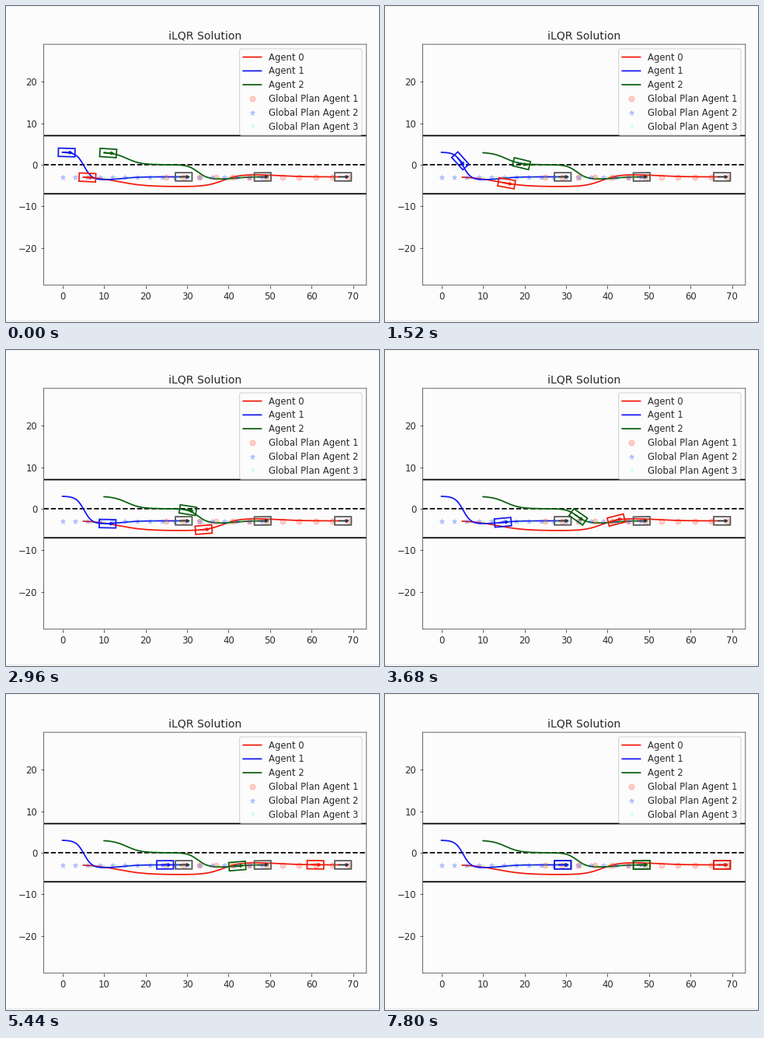
Recreate the animation shown at these times as a matplotlib script. Size 480 by 406 pixels, loop 8.24 s.

```python
import numpy as np
import matplotlib.pyplot as plt
from matplotlib.animation import FuncAnimation
from matplotlib.lines import Line2D
from matplotlib.patches import Polygon

W, H, DPI = 480, 406, 80
K = 1.047  # scales point sizes to the plot's size on the stage
STEP, LOOP, END = 40, 8240, 6360
BG, INK = "#fcfcfc", "#2a2a2a"
RED, BLUE, GREEN = "#f21a0a", "#1018f0", "#0a5f0e"

plt.rcParams.update({
    "font.family": "DejaVu Sans", "font.size": 10 * K, "text.color": INK,
    "axes.linewidth": 0.8 * K, "axes.edgecolor": "#606060",
    "axes.titlepad": 6 * K, "path.snap": False,
    "lines.linewidth": 1.5 * K, "lines.markersize": 6 * K,
})
for axis in ("xtick", "ytick"):
    plt.rcParams.update({
        f"{axis}.major.size": 3.5 * K, f"{axis}.major.width": 0.8 * K,
        f"{axis}.major.pad": 3.5 * K, f"{axis}.color": "#505050",
        f"{axis}.labelcolor": INK})


def spline(u, pts, vals):
    """Smooth curve through the points (pts, vals)."""
    m = np.gradient(vals, pts, edge_order=2)
    i = min(np.searchsorted(pts, u, side="right"), len(pts) - 1) - 1
    h = pts[i + 1] - pts[i]
    s = (u - pts[i]) / h
    d = (vals[i + 1] - vals[i]) / h
    b = 3 * d - 2 * m[i] - m[i + 1]
    c = m[i] + m[i + 1] - 2 * d
    return vals[i] + h * s * (m[i] + s * (b + s * c))


class Agent:
    """Drives along a lane joined by smooth shifts (rise, centre, width)."""

    def __init__(self, color, xs, y0, *shifts):
        self.color, self.xs, self.y0, self.shifts = color, xs, y0, shifts

    def y(self, x):
        return self.y0 + sum(r / 2 * (1 + np.tanh((x - c) / w))
                             for r, c, w in self.shifts)

    def pose(self, sec):
        x = spline(sec, TIMES, self.xs)
        return x, self.y(x), np.arctan((self.y(x + .01) - self.y(x - .01)) / .02)


# key times in seconds; each agent lists its x there
TIMES = [0, 0.8, 2.16, 2.96, 4.48, 5.44, END / 1000]
AGENTS = [
    Agent(RED, [5, 8.7, 23.2, 33, 49.7, 59.9, 66.55], -2.85,
          (-2.44, 13.5, 6.5), (3, 38.6, 4), (-0.64, 52, 6)),
    Agent(BLUE, [0, 1.9, 6.5, 9.85, 18.5, 23.7, 28.2], 3,
          (-6.7, 5.2, 1.9), (0.78, 14.5, 4)),
    Agent(GREEN, [10, 13.8, 23.8, 29.2, 35.1, 41.1, 47.2], 3,
          (-3, 15.5, 3.4), (-3.5, 32.6, 2.4), (0.57, 42, 3)),
]

BOX = np.array([(-1, -1), (3, -1), (3, 1), (-1, 1)])
ARROW = np.array([(0, -.08), (1.65, -.08), (1.65, -.36), (2.35, 0),
                  (1.65, .36), (1.65, .08), (0, .08)])


def add_car(ax, edge, fill, z):
    box = Polygon(BOX, fill=False, ec=edge, lw=1.5 * K, zorder=z)
    arrow = Polygon(ARROW, fc=fill, ec=fill, lw=0.9 * K, zorder=z)
    ax.add_patch(box)
    ax.add_patch(arrow)
    return box, arrow


def move(car, x, y, a):
    c, s = np.cos(a), np.sin(a)
    for part, shape in zip(car, (BOX, ARROW)):
        part.set_xy(shape @ np.array([(c, s), (-s, c)]) + (x, y))


fig = plt.figure(figsize=(W / DPI, H / DPI), dpi=DPI, facecolor=BG)
for y, shade in ((0.5, "#f2f2f2"), (404.5, "#e6e6e6")):
    fig.add_artist(Line2D([0, 1], [1 - y / H] * 2, color=shade, lw=0.9))

L, R, T, B = 48.5, 463.8, 49.2, 358.6
ax = fig.add_axes([L / W, 1 - B / H, (R - L) / W, (B - T) / H], facecolor=BG)
ax.set_xlim(-4.53, 73.18)
ax.set_ylim(-28.99, 28.99)
ax.set_xticks(range(0, 71, 10))
ax.set_yticks(range(-20, 21, 10))
ax.set_title("iLQR Solution", fontsize=12 * K)

for y, style in ((7, "-"), (-7, "-"), (0, "--")):
    ax.axhline(y, color="black", ls=style)

for n, agent in enumerate(AGENTS):
    x = np.linspace(agent.xs[0], agent.xs[-1], 300)
    ax.plot(x, agent.y(x), color=agent.color, label=f"Agent {n}")

PLANS = [(np.arange(25, 70, 4), "o", "#ff3010", 0.22),
         (np.arange(0, 49, 3), "*", "#2040ff", 0.24),
         (np.arange(10, 50, 3), ".", "#40ff80", 0.15)]
for n, (x, mark, color, alpha) in enumerate(PLANS, 1):
    ax.plot(x, np.full(len(x), -2.93), mark, color=color, alpha=alpha,
            label=f"Global Plan Agent {n}")

cars = []
for agent in AGENTS:
    move(add_car(ax, "#555555", "#333333", 3), *agent.pose(TIMES[-1]))
    cars.append(add_car(ax, agent.color, agent.color, 4))

ax.legend(loc="upper right", facecolor=BG, labelspacing=0.41)


def update(i):
    t = i * STEP
    tick = 120 if 1200 <= t < 2400 else 80  # the pace drops for a while
    now = min(t // tick * tick, END) / 1000
    for car, agent in zip(cars, AGENTS):
        move(car, *agent.pose(now))
    return [part for car in cars for part in car]


anim = FuncAnimation(fig, update, frames=LOOP // STEP, interval=STEP,
                     repeat=True)
plt.show()
```
